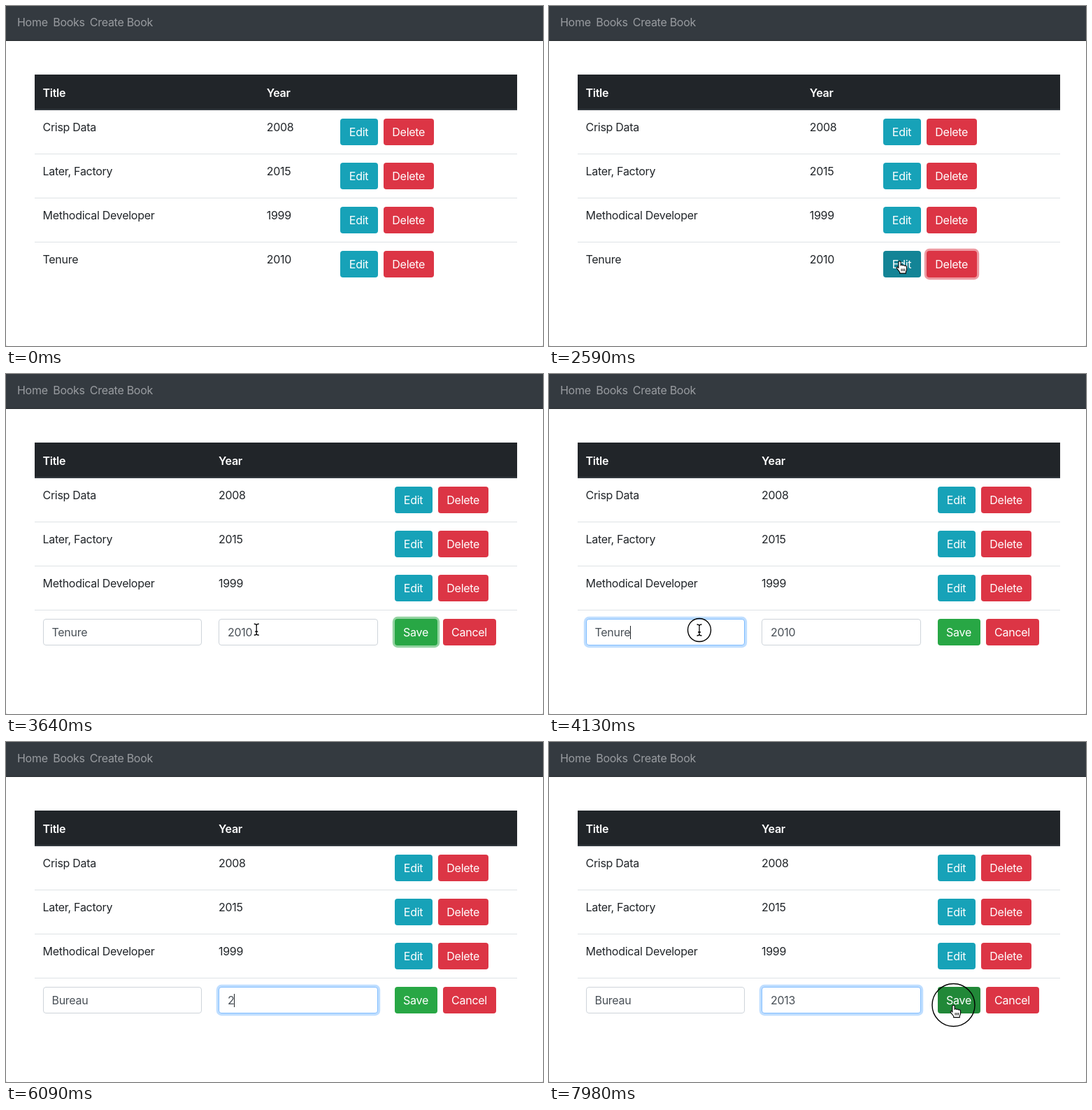
Animation, 768 px wide and 486 px high, one loop 8 s. Source, as an HTML page:

```html
<!DOCTYPE html>
<html lang="en">
<head>
<meta charset="utf-8">
<title>Books</title>
<style>
  html, body { margin: 0; width: 100%; height: 100%; overflow: hidden; background: #dcdcdc; }
  #stage {
    position: relative; width: 768px; height: 486px; overflow: hidden;
    background: #fff; border-radius: 0 0 3px 3px; color: #212529;
    font: 16px/24px Inter, "Open Sans", sans-serif; letter-spacing: -.28px;
  }
  #stage div, svg { position: absolute; box-sizing: border-box; white-space: pre; }
  .nav { left: 0; top: 0; width: 768px; height: 50px; background: #343a40; border-bottom: 1px solid #23272b; }
  .nav div { top: 10.5px; color: #999ca0; }
  .head { left: 40.5px; top: 98px; width: 690px; height: 51px; background: #212529; border-bottom: 2px solid #32383e; }
  .th { top: 111.5px; color: #fff; font-weight: 600; }
  .line { left: 40.5px; width: 690px; height: 1px; background: #dee2e6; }
  .btn { height: 38px; line-height: 38px; border-radius: 4px; color: #fff; text-align: center; }
  .field { top: 350px; width: 227.5px; height: 38px; padding: 0 12px; line-height: 36px;
    border: 1px solid; border-radius: 4px; color: #495057; background: #fff; }
  .selected { background: #b3d7ff; }
  .caret { display: inline-block; width: 1px; height: 19px; margin-right: -1px; vertical-align: -4px; background: #212529; }
  svg { left: 0; top: 0; }
</style>
</head>
<body>
<div id="stage"></div>
<script>
const LOOP = 8000, STEP = 70;
const BOOKS = [["Crisp Data", 2008], ["Later, Factory", 2015], ["Methodical Developer", 1999], ["Tenure", 2010]];
const NEW_TITLE = "Bureau", TITLE_KEYS = [4690, 4900, 5110, 5180, 5320, 5390];
const NEW_YEAR = "2013", YEAR_KEYS = [6090, 6230, 6440, 6580];
const SWAP = 3080, TITLE_FOCUS = 3960, YEAR_FOCUS = 5700;

const TEAL = [23, 162, 184], TEAL_HOVER = [19, 132, 150], TEAL_ACTIVE = [17, 122, 139];
const RED = [220, 53, 69], GREEN = [40, 167, 69], GREEN_HOVER = [33, 136, 56];
const BORDER = [206, 212, 218], BORDER_FOCUS = [128, 189, 255], BLUE = [0, 123, 255];

const CLICKS = [[2800, 3080], [3960, 4270], [7980, 8000]];
const SHOWN = [[1960, 4690], [7000, 8000]];
const MOVES = [
  [1960, 2310, [601, 440], [501.5, 364.5]],
  [3430, 3850, [501.5, 364.5], [215, 366]],
  [6950, 7700, [215, 366], [578.5, 376]],
];
const CURSORS = {
  arrow: `<path d="M0 0V13.5L3.2 10.5 5.2 15.2 7.4 14.3 5.4 9.7 9.6 9.6Z" fill="#000" stroke="#fff"/>`,
  beam: `<path d="M-3.5-8Q0-8 0-6V6Q0 8-3.5 8M3.5-8Q0-8 0-6M0 6Q0 8 3.5 8M-2 3H2" fill="none" stroke="#000" stroke-width="1.3"/>`,
  hand: `<path d="M-1.6 1.4Q0-.8 1.6 1.4V6Q3.2 4.8 4.6 6.4 6.2 5.4 7.4 7 9.6 6.2 10 8.6V12Q10 14 8.8 15.5V17.6H.2V16Q-1.2 14-4 10.6-5 8.6-3 8.6L-1.6 9.8Z" fill="#fff" stroke="#000" stroke-width="1.1"/>
    <path d="M2.6 11V14.6M4.9 11V14.6M7.2 11V14.6" stroke="#000"/>`,
};

const within = (t, [start, end]) => t >= start && t < end;
const ease = (t, start, duration = 150) => {
  const u = Math.min(1, Math.max(0, (t - start) / duration));
  return u * u * (3 - 2 * u);
};
const mix = (a, b, p) => a.map((v, i) => v + (b[i] - v) * p);
const rgb = (c, alpha = 1) => `rgba(${c.map(Math.round)},${alpha})`;
const glow = (color, alpha) => `box-shadow:0 0 0 3.2px ${rgb(color, alpha)}`;
const typed = (text, keys, t) => text.slice(0, keys.filter(k => k <= t).length);

const text = (x, y, label, cls = "") => `<div class="${cls}" style="left:${x}px;top:${y}px">${label}</div>`;
const heading = (x, label) => `<div class="th" style="left:${x}px">${label}</div>`;
const button = (x, y, w, label, color, ring = color, alpha = 0) =>
  `<div class="btn" style="left:${x}px;top:${y}px;width:${w}px;background:${rgb(color)};${glow(ring, alpha)}">${label}</div>`;
const field = (x, value, focus, selected, caret) =>
  `<div class="field" style="left:${x}px;border-color:${rgb(mix(BORDER, BORDER_FOCUS, focus))};${glow(BLUE, .25 * focus)}">` +
  `<span class="${selected ? "selected" : ""}">${value}</span>${caret ? '<span class="caret"></span>' : ""}</div>`;

function table(t) {
  const editing = t >= SWAP;
  const yearX = editing ? 304 : 372.7, buttonX = editing ? 555.5 : 477.5;
  let html = `<div class="head"></div>` + heading(52.5, "Title") + heading(yearX, "Year");
  BOOKS.forEach(([title, year], i) => {
    const y = 161 + 63 * i, last = i === 3;
    if (i) html += `<div class="line" style="top:${y - 13}px"></div>`;
    if (last && editing) { html += editRow(t, y, title, year); return; }
    const press = last ? ease(t, 2790) : 0;
    const hover = last ? ease(t, 2170) : 0;
    const deleteRing = last ? ease(t, 1360) - press : 0;
    html += text(52.5, y, title) + text(yearX, y, year)
      + button(buttonX, y, 54, "Edit", mix(mix(TEAL, TEAL_HOVER, hover), TEAL_ACTIVE, press), TEAL, .5 * press)
      + button(buttonX + 62, y, 72.5, "Delete", RED, RED, .5 * deleteRing);
  });
  return html;
}

function editRow(t, y, title, year) {
  const titleFocus = ease(t, TITLE_FOCUS) - ease(t, YEAR_FOCUS);
  const titleValue = t < TITLE_KEYS[0] ? title : typed(NEW_TITLE, TITLE_KEYS, t);
  const yearValue = t < YEAR_KEYS[0] ? year : typed(NEW_YEAR, YEAR_KEYS, t);
  const titleCaret = within(t, [3990, 4200]) || within(t, [4690, 5740]);
  const yearCaret = within(t, [6090, 7070]) || within(t, [7560, 7910]);
  const turn = ease(t, SWAP);
  const saveColor = mix(mix(TEAL_ACTIVE, GREEN, turn), GREEN_HOVER, ease(t, 7590));
  return field(52.5, titleValue, titleFocus, within(t, [4200, 4690]), titleCaret)
    + field(304, yearValue, ease(t, YEAR_FOCUS), within(t, [5740, 6090]), yearCaret)
    + button(555.5, y, 61, "Save", saveColor, mix(TEAL, GREEN, turn), .5 * (1 - ease(t, TITLE_FOCUS)))
    + button(624.5, y, 76, "Cancel", RED);
}

function cursorKind(t, [x, y]) {
  const inside = (left, right) => x >= left && x <= right && y >= 350 && y <= 388;
  if (t < SWAP) return inside(477, 532) ? "hand" : "arrow";
  if (inside(555, 617)) return "hand";
  return inside(52, 280) || inside(304, 532) ? "beam" : "arrow";
}

function pointer(t) {
  if (!SHOWN.some(span => within(t, span))) return "";
  const [start, end, from, to] = MOVES.filter(m => t >= m[0]).pop();
  const at = mix(from, to, ease(t, start, end - start));
  const click = CLICKS.find(span => within(t, span));
  // the click ring shrinks quickly, then holds until release
  const ring = click
    ? `<circle r="${Math.max(16.5, 30.5 - (t - click[0]) * .2)}" fill="none" stroke="#000" stroke-width="1.4"/>` : "";
  return `<svg width="768" height="486"><g transform="translate(${at})">${ring}${CURSORS[cursorKind(t, at)]}</g></svg>`;
}

const stage = document.getElementById("stage");
const nav = `<div class="nav">${text(16, 10.5, "Home")}${text(67.3, 10.5, "Books")}${text(119.8, 10.5, "Create Book")}</div>`;
const origin = performance.now();
let shown = -1;

function frame() {
  const t = Math.floor(((performance.now() - origin) % LOOP) / STEP) * STEP;
  if (t !== shown) {
    shown = t;
    stage.innerHTML = nav + table(t) + pointer(t);
  }
  requestAnimationFrame(frame);
}
frame();
</script>
</body>
</html>
```
